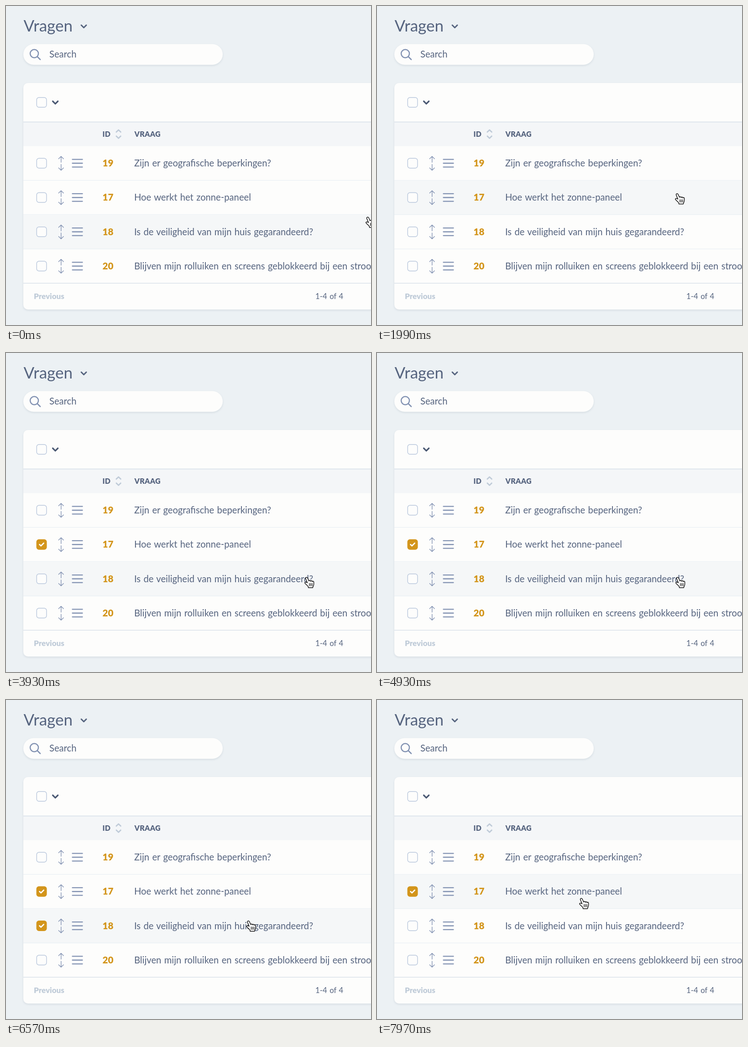
An HTML page for the animation above (7.99 s loop, 800 px wide and 700 px high).

```html
<!DOCTYPE html>
<html lang="nl">
<head>
<meta charset="utf-8">
<title>Vragen</title>
<style>
  html, body { margin: 0; width: 100%; height: 100%; overflow: hidden; background: #ecf1f4; }
  svg { display: block; width: 800px; height: 700px; font: 20.2px Lato, "Open Sans", sans-serif; word-spacing: 1.2px; }
  text { fill: #56647f; }
  .title { font-size: 35px; }
  .head { font-size: 16px; font-weight: 900; letter-spacing: .3px; }
  .id { font-size: 20.6px; font-weight: 900; fill: #d3951b; }
  .small { font-size: 16.8px; }
  .muted { font-size: 17px; font-weight: 900; fill: #bfcbd8; }
  .panel { fill: #fdfdfc; filter: drop-shadow(0 2px 2px rgba(60, 80, 110, .12)); }
  .line { stroke: #e6edf3; }
  .edge { stroke: #d5dee8; stroke-width: 1.3; }
  .icon { fill: none; stroke: #8292b2; stroke-linecap: round; stroke-linejoin: round; }
  .box { fill: #fdfdfc; stroke: #b9c7dc; stroke-width: 1.4; }
  .checked .box { fill: #d3951b; stroke: #d3951b; }
  .tick { fill: none; stroke: #fff; stroke-width: 2.6; stroke-linecap: round; stroke-linejoin: round; visibility: hidden; }
  .checked .tick { visibility: visible; }
  .back { fill: none; }
  .hover .back { fill: #f5f7f8; }
</style>
</head>
<body>
<svg viewBox="0 0 800 700">
  <text class="title" x="38.5" y="56">Vragen</text>
  <path class="icon" d="M165 42 l5.5 5.5 l5.5 -5.5" style="stroke:#56647f;stroke-width:3"/>

  <rect class="panel" x="38" y="83.5" width="437" height="45.5" rx="22.75"/>
  <path class="icon" d="M71 104.5 a9 9 0 1 0 -18 0 a9 9 0 1 0 18 0 M68.5 111 l6.5 6.5" stroke-width="2.5"/>
  <text x="95" y="113">Search</text>

  <rect class="panel" x="38" y="169" width="790" height="497" rx="10"/>
  <rect x="38" y="254" width="762" height="53.5" fill="#f4f6f8"/>
  <path class="edge" d="M38 254.5 H800"/>
  <rect class="box" x="67.2" y="200.7" width="21.6" height="21.6" rx="5"/>
  <path class="icon" d="M102.5 209 l5.6 5.6 l5.6 -5.6" style="stroke:#4b5973;stroke-width:3.2"/>
  <text class="head" x="211.5" y="286.5">ID</text>
  <path class="icon" d="M241.8 276.6 l4.8 -4.6 l4.8 4.6 M241.8 285.6 l4.8 4.6 l4.8 -4.6" style="stroke:#bfcbd8;stroke-width:2.8"/>
  <text class="head" x="281.5" y="286.5">VRAAG</text>

  <g id="rows"></g>

  <path class="edge" d="M38 608.3 H800"/>
  <text class="muted" x="61" y="643">Previous</text>
  <text class="small" x="678" y="643">1-4 of 4</text>

  <g id="cursor" stroke="#111" stroke-width="1.5" stroke-linecap="round" stroke-linejoin="round">
    <path fill="#fff" d="M4.6 1.2 C2.8 1.2 2.2 3 2.9 4.5 L6.5 13.2 C5 12 3 11 1.4 12.2 C.4 13.2 1.2 14.3 2.2 15.2 L7.4 20.3 C8.4 21.3 8.7 23 8.7 24 H18.3 C18.3 22 20.6 19.5 20.6 16 V11.5 C20.6 9.4 17.9 9.2 17.4 10.8 C17.2 8.4 14.2 8.2 13.7 10 C13.2 7.6 10.6 7.6 9.9 9.2 L7 2.7 C6.5 1.6 5.6 1.2 4.6 1.2 Z"/>
    <path fill="none" stroke-width="1.3" d="M11 14.5 V20 M14 14.5 V20 M17 14.5 V20"/>
  </g>
</svg>

<script>
const LOOP = 7990;
const ROW_HEIGHT = 75.25;
const questions = [
  [19, "Zijn er geografische beperkingen?"],
  [17, "Hoe werkt het zonne-paneel"],
  [18, "Is de veiligheid van mijn huis gegarandeerd?"],
  [20, "Blijven mijn rolluiken en screens geblokkeerd bij een stroomstoring?"],
];

// [time, x, y]
const path = [
  [0, 788, 462], [650, 653, 410.5], [2650, 653, 410.5],
  [3250, 655, 458.5], [3650, 654, 491], [5060, 654, 491],
  [5350, 620, 448], [5610, 587, 459.5], [6050, 526.5, 483.5],
  [6950, 526.5, 483.5], [7700, 443, 434], [LOOP, 443, 434],
];

// [time, row index]
const hovers = [[0, 2], [240, 1], [3280, 2], [5260, 1], [5640, 2], [7330, 1]];
// [row index, from, until]
const selections = [[1, 2250, LOOP], [2, 5030, 6850]];

const rowsGroup = document.getElementById("rows");
const cursor = document.getElementById("cursor");

rowsGroup.innerHTML = questions.map(([id, text], i) => `
  <g transform="translate(0 ${345 + i * ROW_HEIGHT})">
    <rect class="back" x="38" y="-37.5" width="762" height="${ROW_HEIGHT}"/>
    <path class="line" d="M38 37.6 H800"/>
    <g transform="translate(78 0)">
      <rect class="box" x="-10.8" y="-10.8" width="21.6" height="21.6" rx="5"/>
      <path class="tick" d="M-4.5 0 L-1.4 3 L4.6 -3"/>
    </g>
    <path class="icon" stroke-width="1.4"
      d="M120.7 -2 V-15 m-5.3 5.3 l5.3 -5.3 l5.3 5.3 M120.7 2.5 V15.5 m-5.3 -5.3 l5.3 5.3 l5.3 -5.3"/>
    <path class="icon" stroke-width="2.3" d="M145.5 -8.3 h22 M145.5 0 h22 M145.5 8.3 h22"/>
    <text class="id" x="211.5" y="7">${id}</text>
    <text x="281" y="7">${text}</text>
  </g>`).join("");
const rows = [...rowsGroup.children];

function cursorAt(t) {
  const next = path.findIndex(([time]) => time > t);
  const [t0, x0, y0] = path[next - 1];
  const [t1, x1, y1] = path[next];
  const p = (t - t0) / (t1 - t0);
  const eased = p * p * (3 - 2 * p);
  return [x0 + (x1 - x0) * eased, y0 + (y1 - y0) * eased];
}

function draw(now) {
  const t = now % LOOP;
  const hovered = hovers.filter(([time]) => time <= t).pop()[1];
  rows.forEach((row, i) => {
    row.classList.toggle("hover", i === hovered);
    row.classList.toggle("checked", selections.some(([r, from, until]) => r === i && t >= from && t < until));
  });
  cursor.setAttribute("transform", `translate(${cursorAt(t)})`);
}

const start = performance.now();
function tick() {
  draw(performance.now() - start);
  requestAnimationFrame(tick);
}
tick();
</script>
</body>
</html>
```
